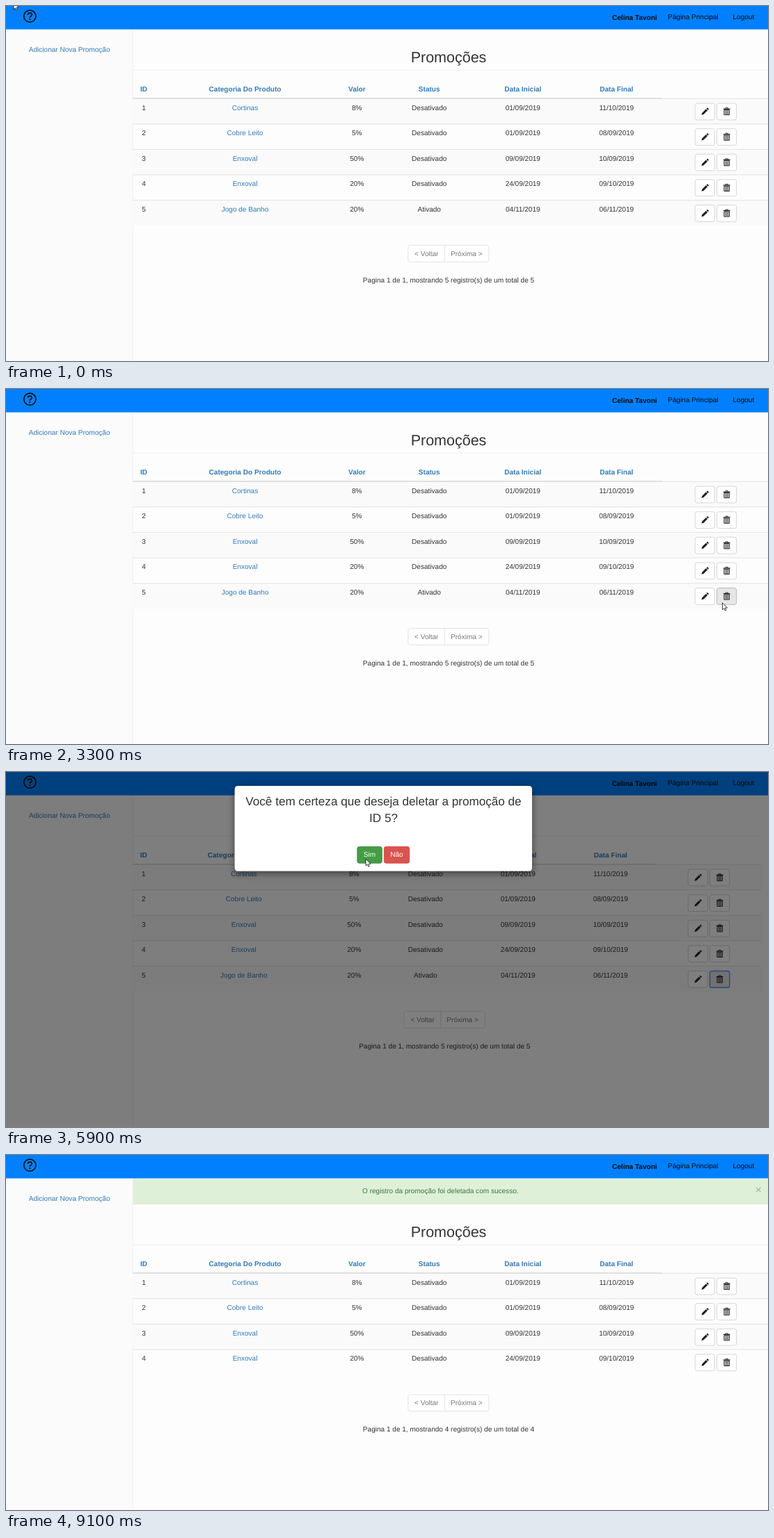
Animation of 1095x511 px, one loop 9.7 s. Source, as an HTML page:

```html
<!DOCTYPE html>
<html lang="pt">
<head>
<meta charset="utf-8">
<title>Promoções</title>
<style>
html, body { margin: 0; width: 100%; height: 100%; overflow: hidden; background: #fcfcfc; }
svg { display: block; }
text { font: 10.05px "Liberation Sans", Arial, sans-serif; text-rendering: geometricPrecision; fill: #333; white-space: pre; }
.mid { text-anchor: middle; }
.bold { font-weight: bold; }
.link { fill: #337ab7; }
.nav { fill: #0a0a0a; }
.title { font-size: 21.5px; }
.ask { font-size: 17.1px; }
.pager { fill: #777; }
.white { fill: #fff; }
.ok { fill: #3c763d; }
.close { font-size: 15px; fill: #000; opacity: .2; }
.status { font-family: "Open Sans", "Noto Sans", sans-serif; font-size: 8.6px; fill: #c4c4c4; }
</style>
</head>
<body>
<svg id="stage" width="1095" height="511" viewBox="0 0 1095 511">
  <defs>
    <filter id="shadow" x="-10%" y="-20%" width="120%" height="150%">
      <feDropShadow dx="0" dy="3.6" stdDeviation="5.4" flood-opacity=".5"/>
    </filter>
    <g id="pencil" fill="#222">
      <path d="M-5 5.2L-4.1 2.1L1.5 -3.5L3.7 -1.3L-1.9 4.3Z"/>
      <path d="M2.1 -4.1L3.1 -5.1Q3.6 -5.4 4.1 -5L5.3 -3.8Q5.6 -3.3 5.2 -2.8L4.3 -1.9Z"/>
    </g>
    <g id="bin" fill="none" stroke="#222">
      <path d="M-4.9 -3.6H4.9" stroke-width="1.3"/>
      <path d="M-1.7 -4V-5.2H1.7V-4" stroke-width=".9"/>
      <path d="M-3.8 -2.3V4.9H3.8V-2.3Z" stroke-width="1"/>
      <path d="M-1.8 -1.6V4.4M0 -1.6V4.4M1.8 -1.6V4.4" stroke-width=".9"/>
    </g>
    <path id="arrow" d="M0 0V10L2.3 7.9L3.8 11.3L5.4 10.6L3.9 7.3H7Z" fill="#fff" stroke="#111" stroke-width=".8" stroke-linejoin="round"/>
    <g id="hand" fill="#fff" stroke="#111" stroke-width=".8" stroke-linejoin="round">
      <path d="M-1 7.6V1Q-1 0 0 0T1 1V4.6Q2.5 4 2.9 5.1Q4.2 4.7 4.6 5.7Q6 5.6 6 7V9.4Q6 10.8 5 12.6H-.2Q-1 11-2.6 9.2L-3.8 7.6Q-4 6.4-2.8 6.5Z"/>
      <path d="M1 4.6V7M2.9 5.1V7M4.6 5.7V7.2" fill="none"/>
    </g>
  </defs>
</svg>
<script>
const LOOP = 9700, STEP = 36.6;
const ROWS = [
  ["Cortinas", "8%", "Desativado", "01/09/2019", "11/10/2019"],
  ["Cobre Leito", "5%", "Desativado", "01/09/2019", "08/09/2019"],
  ["Enxoval", "50%", "Desativado", "09/09/2019", "10/09/2019"],
  ["Enxoval", "20%", "Desativado", "24/09/2019", "09/10/2019"],
  ["Jogo de Banho", "20%", "Ativado", "04/11/2019", "06/11/2019"]
];
const HEADS = ["ID", "Categoria Do Produto", "Valor", "Status", "Data Inicial", "Data Final"];
const WIDE = { cols: [198, 343.5, 504.3, 608.2, 742.8, 877.3], right: 1095, mid: 636 };
const NARROW = { cols: [197.8, 341.7, 500.3, 602.8, 735.8, 868.8], right: 1085, mid: 630.3 };

const text = (x, y, s, cls = "") => `<text x="${x}" y="${y}" class="${cls}">${s.replace(/</g, "&lt;")}</text>`;
const box = (x, y, w, h, fill, more = "") => `<rect x="${x}" y="${y}" width="${w}" height="${h}" fill="${fill}" ${more}/>`;
const rule = (x1, x2, y, color, w = .8) => `<path d="M${x1} ${y}H${x2}" stroke="${color}" stroke-width="${w}"/>`;
const button = (x, y, w, fill, edge, more = "") => box(x, y, w, 23.8, fill, `rx="2.9" stroke="${edge}" stroke-width=".8" ${more}`);

function iconButton(x, y, icon, id) {
  return button(x, y, 28.2, "#fff", "#ccc", id ? `id="${id}"` : "") +
    `<use href="#${icon}" x="${x + 14.2}" y="${y + 11.7}"/>`;
}

function table({ cols, right, mid }, count, dy, binId) {
  let out = text(mid, 81 + dy, "Promoções", "mid title") + rule(182, right, 92.3 + dy, "#eee");
  HEADS.forEach((h, i) => out += text(cols[i], 122.6 + dy, h, "mid bold link"));
  for (let i = 0; i < count; i++) {
    const y = 133.2 + dy + i * STEP;
    if (i % 2 == 0) out += box(182, y, right - 182, STEP, "#fafafa");
    out += rule(182, right, y, "#ddd");
    [String(i + 1), ...ROWS[i]].forEach((s, c) =>
      out += text(cols[c], y + 16.4, s, c == 1 ? "mid link" : "mid"));
    out += iconButton(right - 104.8, y + 6.9, "pencil");
    out += iconButton(right - 73.5, y + 6.9, "bin", i == 4 && binId);
  }
  out += rule(182, right - 152, 132.8 + dy, "#ddd", 1.4);
  const py = 344.6 + dy - (5 - count) * STEP;
  out += button(mid - 58.2, py, 116, "#fff", "#ddd") +
    `<path d="M${mid - 5.6} ${py}v23.8" stroke="#ddd" stroke-width=".8"/>` +
    text(mid - 31.7, py + 15.2, "< Voltar", "mid pager") +
    text(mid + 25.8, py + 15.2, "Próxima >", "mid pager") +
    text(mid, py + 53, `Pagina 1 de 1, mostrando ${count} registro(s) de um total de ${count}`, "mid");
  return out;
}

const group = (id, inner) => `<g id="${id}">${inner}</g>`;
const frame = box(0, 0, 1095, 511, "#fdfdfd") + box(0, 33, 182, 478, "#fbfbfb") +
  `<path d="M182.2 34V511" stroke="#eee" stroke-width=".8"/>` +
  box(0, 0, 1095, 33.6, "#0080ff") +
  `<circle cx="34.3" cy="14.7" r="8.6" fill="none" stroke="#0a0a0a" stroke-width="1.6"/>` +
  `<path d="M31.4 12.6Q31.5 10 34.3 10T37.2 12.5Q37.2 13.8 35.6 14.7T34.3 16.7" fill="none" stroke="#0a0a0a" stroke-width="1.6"/>` +
  `<circle cx="34.3" cy="19" r="1.1"/>` +
  text(871, 20, "Celina Tavoni", "bold nav") +
  text(951, 18.8, "Página Principal", "nav") + text(1044.5, 18.8, "Logout", "nav") +
  text(32.8, 65.6, "Adicionar Nova Promoção", "link");

const dialog = box(0, 0, 1095, 511, "#000", 'opacity=".5"') +
  box(328.7, 20, 427.2, 122.4, "#fff", 'rx="4.3" filter="url(#shadow)"') +
  text(542.5, 48.4, "Você tem certeza que deseja deletar a promoção de", "mid ask") +
  text(542.5, 72.4, "ID 5?", "mid ask") +
  button(504.8, 107.4, 35.5, "#5cb85c", "#4cae4c", 'id="yes"') + text(522.5, 122.4, "Sim", "mid white") +
  button(543.3, 107.4, 36.4, "#d9534f", "#d43f3a") + text(561.5, 122.4, "Não", "mid white");

const alertBar = box(182.4, 34, 912.6, 36.6, "#dff0d8") + rule(182, 1095, 70.4, "#d6e9c6") +
  text(624.3, 55.2, "O registro da promoção foi deletada com sucesso.", "mid ok") +
  text(1081.3, 55, "×", "mid bold close");

const statusBar = `<path d="M0 497H361Q364 497 364 500V511H0Z" fill="#292929"/>` +
  `<text id="note" x="2.6" y="507.4" class="status"></text>`;

document.getElementById("stage").insertAdjacentHTML("beforeend", frame +
  group("before", table(WIDE, 5, 0, "bin5")) +
  group("asking", table(NARROW, 5, 0, "bin5dim") + dialog) +
  group("after", alertBar + table(WIDE, 4, 37)) +
  group("status", statusBar) +
  `<use id="cursor" href="#arrow"/>`);

// Pointer path: time, x, y
const PATH = [
  [0, 11, -5], [300, 11, -5], [400, 150, 90], [500, 480, 290], [600, 667, 345], [700, 655, 250],
  [800, 655, 250], [1100, 540, 176], [1300, 498, 190], [1600, 590, 262], [1800, 709, 294],
  [2000, 852, 313], [2100, 852, 313], [2300, 885, 314], [2400, 885, 314], [3200, 1022, 313],
  [3400, 1037, 302.5], [4900, 1037, 302.5], [5200, 658, 186], [5300, 658, 186], [5900, 517, 125],
  [8200, 517, 125], [8500, 245, 61], [8600, 245, 61], [8800, 671, 22], [9000, 83, 3],
  [9100, 40, -20], [9700, 40, -20]
];

function pointAt(t) {
  const i = Math.max(1, PATH.findIndex(p => p[0] >= t));
  const [t0, x0, y0] = PATH[i - 1], [t1, x1, y1] = PATH[i];
  const k = (t - t0) / (t1 - t0);
  return [x0 + (x1 - x0) * k, y0 + (y1 - y0) * k];
}

const el = id => document.getElementById(id);
const show = (id, on) => el(id).setAttribute("display", on ? "inline" : "none");
const paint = (id, fill, edge, w = .8) => {
  const e = el(id);
  e.setAttribute("fill", fill);
  e.setAttribute("stroke", edge);
  e.setAttribute("stroke-width", w);
};

function draw(time) {
  const t = Math.floor(time / 100) * 100;
  const within = (a, b) => t >= a && t < b;
  show("before", t < 4600);
  show("asking", within(4600, 7500));
  show("after", t >= 7500);

  if (t >= 4500) paint("bin5", "#d4d4d4", "#4a86d0", 1.4);
  else if (t >= 3300) paint("bin5", "#e6e6e6", "#adadad");
  else paint("bin5", "#fff", "#ccc");
  if (t < 6500) paint("bin5dim", "#e6e6e6", "#5b96e6", 1.4);
  else paint("bin5dim", "#fff", "#ccc");
  if (t >= 5800) paint("yes", "#449d44", "#398439");
  else paint("yes", "#5cb85c", "#4cae4c");

  show("status", within(6100, 7900));
  el("status").setAttribute("opacity", t >= 7800 ? .45 : 1);
  el("note").textContent = t < 7100 ? "localhost/promocoes/delete/5" : "Aguardando localhost...";
  el("note").setAttribute("opacity", t >= 7500 ? .75 : 1);

  const hand = within(3500, 4600) || within(6100, 8300);
  const [x, y] = pointAt(t);
  el("cursor").setAttribute("href", hand ? "#hand" : "#arrow");
  el("cursor").setAttribute("transform", `translate(${x + (hand ? .8 : 0)} ${y})`);
}

const start = performance.now();
function tick() {
  draw((performance.now() - start) % LOOP);
  requestAnimationFrame(tick);
}
tick();
</script>
</body>
</html>
```
